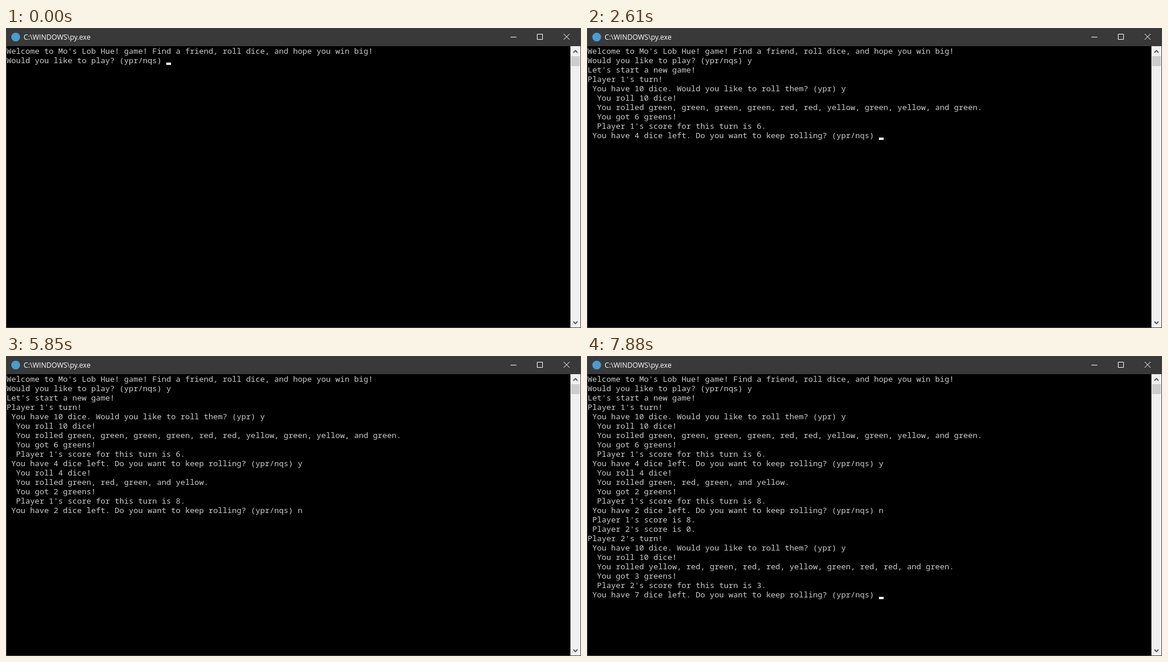
An HTML page for the animation above (8 s loop, 979 by 512 pixels).

```html
<!DOCTYPE html>
<html lang="en">
<head>
<meta charset="utf-8">
<title>Dice game console</title>
<style>
  html, body { margin: 0; width: 100%; height: 100%; overflow: hidden; background: #000; }
  svg { display: block; }
  .title { font: 12px "Open Sans", sans-serif; fill: #fff; }
  #console text { font: 13.3333px "Noto Sans Mono", monospace; fill: #ccc; white-space: pre; }
</style>
</head>
<body>
<svg width="979" height="512" viewBox="0 0 979 512">
  <rect width="979" height="512" fill="#444"/>
  <rect x="1" y="1" width="977" height="30" fill="#393939"/>
  <rect x="1" y="31" width="960" height="480" fill="#000"/>

  <circle cx="16.5" cy="15.5" r="7.5" fill="#4a9ccf"/>
  <text class="title" x="30" y="20">C:\WINDOWS\py.exe</text>
  <g fill="none" stroke="#fff">
    <path d="M859 15.5h10M904.5 10.5h9v9h-9z"/>
    <path d="M949.5 10l10 10M959.5 10l-10 10"/>
  </g>

  <rect x="961" y="31" width="17" height="480" fill="#f0f0f0"/>
  <rect x="962" y="48" width="15" height="17" fill="#cdcdcd"/>
  <path d="M966 42l3.5-3.5 3.5 3.5M966 501l3.5 3.5 3.5-3.5" fill="none" stroke="#555" stroke-width="1.8"/>

  <g id="console"></g>
  <rect id="cursor" width="8" height="4" fill="#fff"/>
</svg>
<script>
const LOOP = 8000, LEFT = 1, TOP = 31, CELL = 8, ROW = 16, BASELINE = 13;

const ask = dice => ` You have ${dice} dice left. Do you want to keep rolling? (ypr/nqs) `;
const firstRoll = player =>
  `Player ${player}'s turn!\n You have 10 dice. Would you like to roll them? (ypr) `;
const roll = (player, dice, colors, greens, score) =>
  `\n  You roll ${dice} dice!\n  You rolled ${colors}.\n  You got ${greens} greens!` +
  `\n  Player ${player}'s score for this turn is ${score}.\n` + ask(dice - greens);

// Each event: time in ms, cursor visible, text appended to the console.
const events = [
  [0, true, "Welcome to Mo's Lob Hue! game! Find a friend, roll dice, and hope you win big!\n" +
    "Would you like to play? (ypr/nqs) "],
  [110, false, ""],
  [410, true, "y"],
  [590, false, ""],
  [730, true, "\nLet's start a new game!\n" + firstRoll(1)],
  [1660, false, ""],
  [2290, true, ""],
  [2440, true, "y"],
  [2610, true, roll(1, 10,
    "green, green, green, green, red, red, yellow, green, yellow, and green", 6, 6)],
  [3220, false, ""],
  [3850, true, ""],
  [4320, false, "y"],
  [4460, true, roll(1, 4, "green, red, green, and yellow", 2, 8)],
  [5390, false, ""],
  [5850, false, "n"],
  [6170, true, "\n Player 1's score is 8.\n Player 2's score is 0.\n" + firstRoll(2)],
  [6950, false, ""],
  [7580, true, ""],
  [7730, true, "y"],
  [7880, true, roll(2, 10,
    "yellow, red, green, red, red, yellow, green, red, red, and green", 3, 3)],
];

const consoleGroup = document.getElementById("console");
const cursor = document.getElementById("cursor");
let shown = -1;

function render(count) {
  const past = events.slice(0, count);
  const lines = past.map(event => event[2]).join("").split("\n");
  consoleGroup.replaceChildren(...lines.map((line, row) => {
    const text = document.createElementNS("http://www.w3.org/2000/svg", "text");
    text.setAttribute("x", LEFT);
    text.setAttribute("y", TOP + row * ROW + BASELINE);
    text.textContent = line;
    return text;
  }));
  const row = lines.length - 1;
  cursor.setAttribute("x", LEFT + lines[row].length * CELL);
  cursor.setAttribute("y", TOP + row * ROW + 12);
  cursor.setAttribute("visibility", past[count - 1][1] ? "visible" : "hidden");
}

const start = performance.now();
function tick() {
  const time = (performance.now() - start) % LOOP;
  const count = events.filter(event => event[0] <= time).length;
  if (count !== shown) render(shown = count);
  requestAnimationFrame(tick);
}
tick();
</script>
</body>
</html>
```
